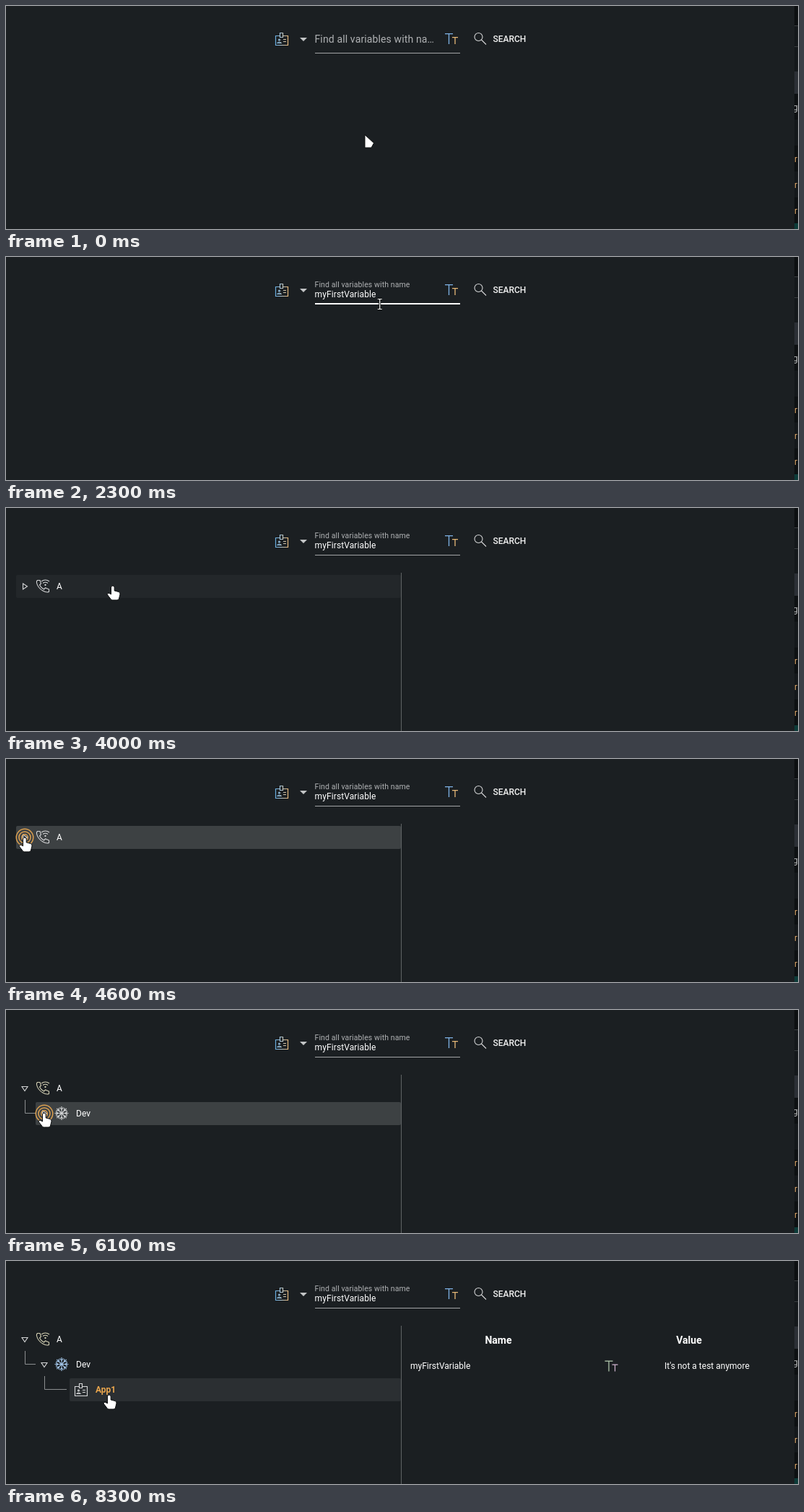
Recreate the animation shown at these times as an HTML page. Size 1097 by 310 pixels, loop 8400 ms.

```html
<!DOCTYPE html>
<html lang="en">
<head>
<meta charset="utf-8">
<title>Variable search</title>
<style>
  html, body { margin: 0; width: 100%; height: 100%; overflow: hidden; background: #1b1f22; }
  svg { display: block; width: 1097px; height: 310px; font: 12px Roboto, sans-serif; fill: #fff; }
  .line { fill: none; stroke: #d6d7d8; stroke-width: 1.1; }
  .spaced { letter-spacing: .0094em; }
  .bold { font-weight: 700; }
  .tree { fill: none; stroke: #8b8e90; }
  .pointer { fill: #fff; stroke: #0a0c0d; stroke-width: 1; stroke-linejoin: round; }
</style>
</head>
<body>
<svg viewBox="0 0 1097 310">
  <defs>
    <linearGradient id="duo" gradientUnits="userSpaceOnUse" x1="372" y1="0" x2="391" y2="0">
      <stop offset="0" stop-color="#5ba8e0"/><stop offset=".45" stop-color="#a9c4d6"/><stop offset="1" stop-color="#e9b878"/>
    </linearGradient>
    <g id="card">
      <path d="M7.500 5.500H1.500V18.500H18.500V5.500H11.500M7.500 7.500V1.500H11.500V7.500Z"/>
      <path d="M12 10.500H16M12 13.500H16M4 15.500Q6.500 12.500 9 15.500Z"/>
      <circle cx="6.500" cy="11" r="1"/>
    </g>
    <path id="bigT" d="M0 .700H11M5.500 .700V15"/>
    <path id="smallT" d="M10 5.700H18M14 5.700V15"/>
    <clipPath id="edge"><rect x="1092" width="5" height="310"/></clipPath>
  </defs>

  <rect width="1097" height="310" fill="#1b1f22"/>

  <g clip-path="url(#edge)">
    <rect x="1092" width="5" height="310" fill="#14181b"/>
    <rect x="1092" width="5" height="27" fill="#0c0f11"/>
    <path d="M1092 27.500h5M1092 56.500h5" stroke="#3a3e41"/>
    <rect x="1092" y="91" width="5" height="31" fill="#2b2f35"/>
    <path d="M1092 122h5v36h-5zM1092 194h5v36h-5zM1092 266h5v36h-5z" fill="#0d1012"/>
    <rect x="1092" y="302" width="5" height="8" fill="#0c3b38"/>
    <text x="1090" y="145" fill="#b9bbbc">g</text>
    <g fill="#d9a468"><text x="1092" y="217">r</text><text x="1092" y="253">r</text><text x="1092" y="289">r</text></g>
  </g>

  <rect id="button" x="641" y="26" width="83" height="40" rx="2" fill="#3c4043"/>
  <use href="#card" class="line" transform="translate(372 36)" style="stroke:none"/>
  <g fill="none" stroke="url(#duo)" stroke-width="1.2">
    <path d="M379.500 41.500H373.500V54.500H390.500V41.500H383.500M379.500 43.500V37.500H383.500V43.500Z"/>
    <path d="M384 46.500H388M384 49.500H388M376 51.500Q378.500 48.500 381 51.500Z"/>
    <circle cx="378.500" cy="47" r="1"/>
  </g>
  <path d="M407 44H417L412 49Z" fill="#c4c6c7"/>
  <text id="label" class="spaced" font-size="14"></text>
  <text id="value" class="spaced" x="427.500" y="56">myFirstVariable</text>
  <path id="caret" d="M428.500 45V59" stroke="#fff"/>
  <path id="underline" d="M428 65.500H629"/>
  <path id="ink" stroke="#fff" stroke-width="2"/>
  <g fill="none" stroke-width="1.300" transform="translate(608 38)">
    <use id="typeBig" href="#bigT"/><use id="typeSmall" href="#smallT"/>
  </g>
  <g class="line"><circle cx="654.500" cy="43" r="5.500"/><path d="M658.500 47L665 53.500"/></g>
  <text x="674.500" y="50" font-weight="500" fill="#f1f1f1">SEARCH</text>

  <g id="results">
    <path d="M547.500 90V310" stroke="#5f6365"/>
    <rect id="rowA" x="14" y="93" width="533" height="32" rx="2"/>
    <path id="arrowA" class="line"/>
    <g class="line" id="phone">
      <path d="M43.500 100.500L47 100.500L48.500 105L46.500 107Q48.500 111 52.500 113L54.500 111L59.500 113V116.500Q56 118 51 115Q44 111 42.500 104Q42 101.500 43.500 100.500Z"/>
      <path d="M49 102Q54.500 98 60 102M51 104.500Q54.500 102 58 104.500"/>
      <circle cx="54.500" cy="107" r=".600"/>
    </g>
    <text x="70" y="113">A</text>
  </g>

  <g id="dev">
    <rect id="rowDev" x="41" y="128" width="506" height="32" rx="2"/>
    <path class="tree" d="M26.500 125V143.500H41"/>
    <path id="arrowDev" class="line"/>
    <g id="flake" class="line"></g>
    <text x="97" y="148">Dev</text>
  </g>

  <g id="app">
    <rect id="rowApp" x="88" y="163" width="459" height="32" rx="2"/>
    <path class="tree" d="M53.500 160V178.500H84"/>
    <use href="#card" class="line" transform="translate(94 169)"/>
    <text id="appName" class="bold" x="124" y="183">App1</text>
  </g>

  <g id="table">
    <g class="bold" font-size="14" text-anchor="middle"><text x="682" y="115">Name</text><text x="946" y="115">Value</text></g>
    <text x="560" y="150">myFirstVariable</text>
    <g fill="none" stroke-width="1.200" transform="translate(829.500 138.500)">
      <use href="#bigT" stroke="#b9d0b4"/><use href="#smallT" stroke="#d0b4cf"/>
    </g>
    <text x="912" y="150">It's not a test anymore</text>
  </g>

  <g id="ripple" fill="none" stroke="#dca050" stroke-width="1.500"></g>
  <g id="pointer">
    <path id="arrow" class="pointer" d="M0 0V18H9L12.500 11.500Z"/>
    <path id="hand" class="pointer" d="M-2.500 2Q0 -2 2.200 2V7L8 8.500Q10.500 9.500 10 12L8.500 18Q8 20 6 20H-.500Q-2 20 -3 18.500L-8 12Q-7.500 9.500 -5 10.500L-2.500 12Z"/>
    <g id="beam" fill="none">
      <path d="M-3 -7H3M0 -7V7M-3 7H3" stroke="#0a0c0d" stroke-width="3"/>
      <path d="M-3 -7H3M0 -7V7M-3 7H3" stroke="#fff" stroke-width="1.200"/>
    </g>
  </g>
</svg>

<script>
const LOOP = 8400, STEP = 100;
const $ = id => document.getElementById(id);
const set = (id, attrs) => { for (const k in attrs) $(id).setAttribute(k, attrs[k]); };
const show = (id, on) => { $(id).style.display = on ? "" : "none"; };
const clamp = x => Math.min(1, Math.max(0, x));
const during = (t, from, to) => t >= from && t < to;
const easeOut = (t, start, length) => 1 - (1 - clamp((t - start) / length)) ** 3.5;

// Time, x, y of the pointer's hot spot
const path = [
  [100, 497, 179], [300, 500, 150], [500, 498, 95], [700, 495.500, 57],
  [2200, 495.500, 57], [2400, 540, 74], [2600, 640, 83], [2750, 713, 62], [2900, 708, 47],
  [3600, 708, 47], [3800, 450, 82], [3900, 260, 104], [4000, 148, 108], [4400, 26, 109],
  [4900, 26, 109], [5300, 34, 126], [5600, 50, 140], [5800, 53, 143],
  [6300, 53, 143], [6500, 95, 168], [6700, 143, 186]
];
// Time, x, y of each click
const clicks = [[760, 496, 57], [3085, 709, 46], [4450, 26, 109], [5950, 53, 144], [6840, 143, 184]];

const HOVER = "#23272a", ACTIVE = "#3d4143", CURRENT = "#2b2f32";

function pointerAt(t) {
  const i = path.findIndex(p => p[0] > t);
  if (i === 0) return path[0].slice(1);
  if (i < 0) return path[path.length - 1].slice(1);
  const a = path[i - 1], b = path[i], k = (t - a[0]) / (b[0] - a[0]);
  return [a[1] + (b[1] - a[1]) * k, a[2] + (b[2] - a[2]) * k];
}

function drawField(t) {
  const float = easeOut(t, 937, 400);
  const scale = 1 - float / 4;
  $("label").textContent = float ? "Find all variables with name" : "Find all variables with na…";
  set("label", {
    transform: `translate(427.500 ${51 - 9.500 * float}) scale(${scale})`,
    fill: during(t, 900, 1300) ? "#c3c5c6" : "#b0b2b4"
  });
  const half = 100.500 * (float - easeOut(t, 3087, 400));
  set("ink", { d: `M${528.500 - half} 65H${528.500 + half}` });
  show("ink", half > .5);
  set("underline", { stroke: during(t, 800, 1300) ? "#fff" : "#a3a5a6" });
  show("caret", during(t, 1000, 1800));
  show("value", t >= 1800);
  const plain = during(t, 900, 1300);
  set("typeBig", { stroke: plain ? "#c9cacb" : "#7fb2e6" });
  set("typeSmall", { stroke: plain ? "#c9cacb" : "#e6b877" });
}

function fillRow(id, color) {
  set(id, { fill: color || "none" });
}

function drawArrow(id, x, y, open) {
  set(id, { d: open ? `M${x - 4} ${y - 2.500}h8l-4 6z` : `M${x - 2.500} ${y - 4}v8l6 -4z` });
}

function drawTree(t, [x, y]) {
  show("results", t >= 3300);
  show("dev", t >= 4700);
  show("app", t >= 6200);
  show("table", t >= 7200);
  drawArrow("arrowA", 26, 109, t >= 4700);
  drawArrow("arrowDev", 53, 144, t >= 6200);

  const overA = t >= 3800 && x < 547 && y >= 93 && y < 126;
  fillRow("rowA", during(t, 4500, 5500) ? ACTIVE : overA && HOVER);
  fillRow("rowDev", during(t, 6000, 6500) ? ACTIVE : during(t, 5600, 7300) && HOVER);
  fillRow("rowApp", during(t, 6800, 7200) ? "#3b3e41" : t >= 6600 && CURRENT);
  set("phone", { style: `stroke:${t < 5500 ? "#d6d7d8" : "#d3d0b4"}` });
  set("flake", { style: `stroke:${during(t, 5600, 7400) ? "#d6d7d8" : "#a5c8ec"}` });
  set("appName", { fill: t < 7300 ? "#fff" : "#eaa64d" });
}

function drawRipple(t) {
  const click = clicks.find(c => during(t, c[0], c[0] + 300));
  show("ripple", click);
  if (!click) return;
  const radius = 5 + (t - click[0]) * .045;
  let rings = "";
  for (let r = radius; r > 1.500; r -= 3.700)
    rings += `<circle cx="${click[1]}" cy="${click[2]}" r="${r}"/>`;
  $("ripple").innerHTML = rings;
}

function drawPointer(t, [x, y]) {
  const overField = during(t, 600, 2400) && y < 68;
  const overButton = x > 641 && x < 724 && y < 66;
  const overTree = t >= 3800 && x < 547 && y >= 93;
  const hand = overButton || overTree;
  show("beam", overField);
  show("hand", hand);
  show("arrow", !overField && !hand);
  show("button", overButton);
  set("pointer", { transform: `translate(${x} ${y})` });
}

function render(time) {
  const t = Math.floor(time % LOOP / STEP) * STEP;
  const pointer = pointerAt(t);
  drawField(t);
  drawTree(t, pointer);
  drawRipple(t);
  drawPointer(t, pointer);
}

for (let a = 0; a < 360; a += 45)
  $("flake").innerHTML += `<path transform="translate(77 143.500) rotate(${a})" d="M0 0V-9.500M-2.500 -8L0 -5L2.500 -8"/>`;

const start = performance.now();
function tick() {
  render(performance.now() - start);
  requestAnimationFrame(tick);
}
tick();
</script>
</body>
</html>
```
